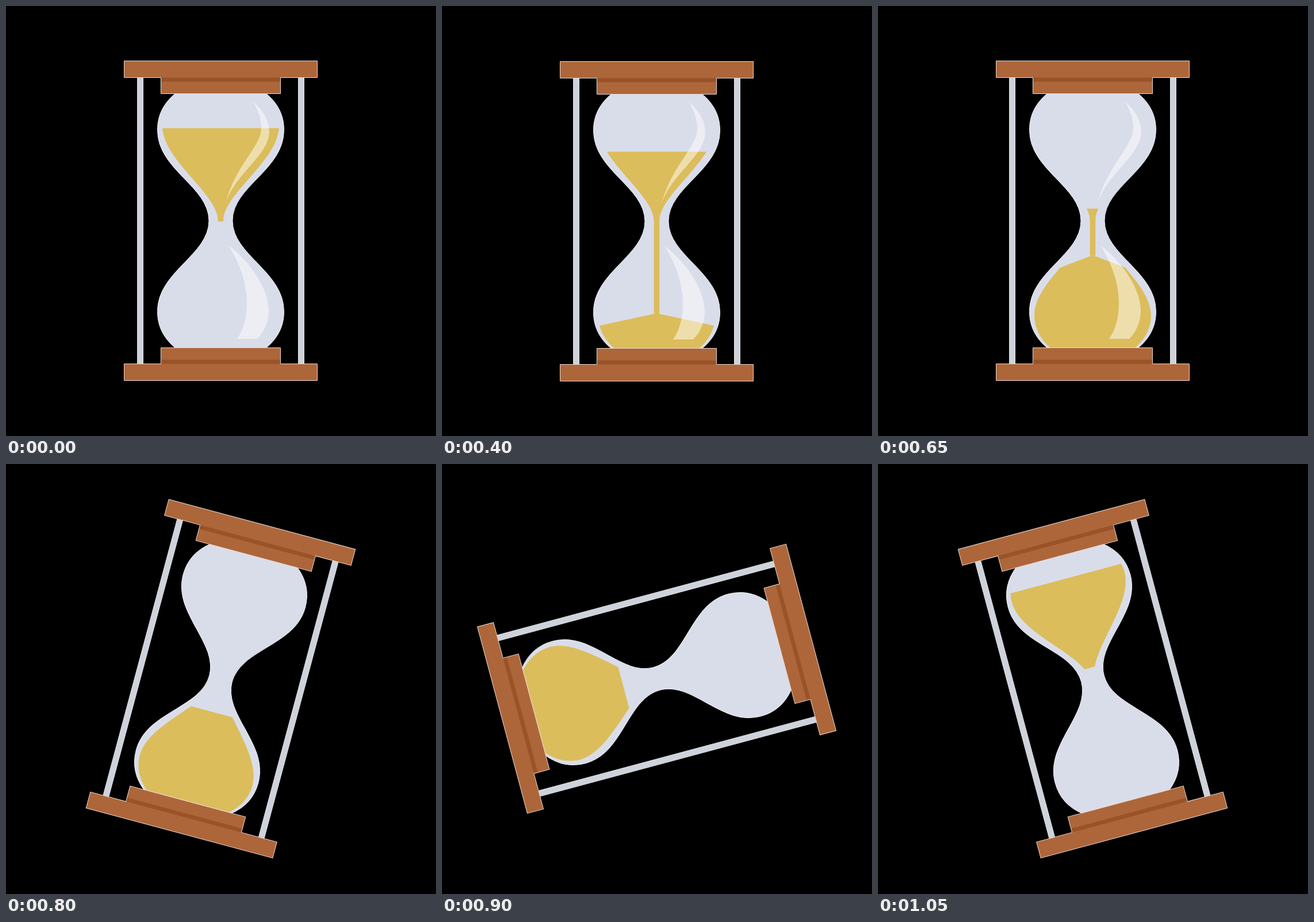
Animation, 748 px wide and 748 px high, one loop 1100 ms. Source, as an HTML page with a canvas:

```html
<!DOCTYPE html>
<html lang="en">
<head>
<meta charset="utf-8">
<title>Hourglass</title>
<style>
  html, body { margin: 0; width: 100%; height: 100%; overflow: hidden; background: #000; }
  canvas { display: block; width: 100vw; height: 100vh; }
</style>
</head>
<body>
<canvas id="stage" width="748" height="748"></canvas>
<script>
const ctx = document.getElementById('stage').getContext('2d');
const LOOP = 1100, STEP = 50, SPEED = 0.4;
const SAND = '#dcbd5c', GLASS = '#d9dde9', WOOD = '#ad663a', SHADE = '#9a5329', ROD = '#ced2da';
const WOOD_RIM = '#ecd9cf', GLASS_RIM = '#f0f2f7', ROD_RIM = '#dfe2e7';
const STREAM = 4.75, PLATEAU = 59.5, BASE = 220.4;

// Profiles of half a bulb as [half width, distance from the neck], two cubic pieces each.
const OUTER = [[20.5, 0], [20.5, 60], [110, 88], [110, 158], [110, 185], [98, 206], [78, 222]];
const INNER = [[4.75, 0], [4.25, 47], [101.5, 105], [101.5, 165], [101.5, 184], [93.5, 204], [73, 222]];

const clamp = (v, a, b) => Math.min(b, Math.max(a, v));

function tracePieces(path, p, sx, sy) {
  for (let i = 1; i < 7; i += 3) {
    path.bezierCurveTo(p[i][0] * sx, p[i][1] * sy, p[i + 1][0] * sx, p[i + 1][1] * sy,
      p[i + 2][0] * sx, p[i + 2][1] * sy);
  }
}

function bulbs(p) {
  const path = new Path2D(), back = p.slice().reverse();
  path.moveTo(p[6][0], -p[6][1]);
  tracePieces(path, back, 1, -1);
  tracePieces(path, p, 1, 1);
  path.lineTo(-p[6][0], p[6][1]);
  tracePieces(path, back, -1, 1);
  tracePieces(path, p, -1, -1);
  path.closePath();
  return path;
}

const glass = bulbs(OUTER), cavity = bulbs(INNER);

function cubic(p, i, axis, u) {
  const v = 1 - u;
  return v * v * v * p[i][axis] + 3 * v * v * u * p[i + 1][axis] +
    3 * v * u * u * p[i + 2][axis] + u * u * u * p[i + 3][axis];
}

function cavityWidth(y) {
  const i = y < INNER[3][1] ? 0 : 3;
  let lo = 0, hi = 1;
  for (let k = 0; k < 20; k++) {
    const mid = (lo + hi) / 2;
    if (cubic(INNER, i, 1, mid) < y) lo = mid; else hi = mid;
  }
  return cubic(INNER, i, 0, lo);
}

function band(top, bottom) {
  ctx.fillRect(-120, top, 240, bottom - top);
}

function polygon(points) {
  ctx.beginPath();
  points.forEach(([x, y]) => ctx.lineTo(x, y));
  ctx.closePath();
}

function drawRods() {
  ctx.fillStyle = ROD;
  ctx.strokeStyle = ROD_RIM;
  for (const x of [-145, 135]) {
    ctx.fillRect(x, -250, 10, 500);
    ctx.strokeRect(x, -250, 10, 500);
  }
}

function drawGlass() {
  ctx.fillStyle = GLASS;
  ctx.strokeStyle = GLASS_RIM;
  ctx.fill(glass);
  ctx.stroke(glass);
}

function drawWood(side) {
  ctx.save();
  ctx.scale(1, side);
  polygon([[-168, -278], [168, -278], [168, -249], [104, -249],
    [104, -221], [-104, -221], [-104, -249], [-168, -249]]);
  ctx.fillStyle = WOOD;
  ctx.fill();
  ctx.fillStyle = SHADE;
  ctx.fillRect(-104, -249, 208, 7);
  ctx.strokeStyle = WOOD_RIM;
  ctx.stroke();
  ctx.restore();
}

function drawStream(top, front, bottom) {
  const r = STREAM;
  ctx.beginPath();
  if (front < bottom) {
    // Falling front with a split, pointed end.
    ctx.moveTo(-r, top);
    ctx.lineTo(r, top);
    ctx.lineTo(r, Math.max(top, front - 26));
    ctx.quadraticCurveTo(3, front - 42, 0.5, front - 42);
    ctx.quadraticCurveTo(-2.5, front - 40, -r, front);
  } else if (top < bottom) {
    ctx.rect(-r, top, 2 * r, bottom - top);
  }
  ctx.fill();
}

function drawFlow(t) {
  const level = -161 + SPEED * Math.max(0, t - 300);
  const apex = Math.max(PLATEAU, 160 - SPEED * (t - 400));
  const edge = Math.max(PLATEAU, 181.5 - SPEED * (t - 400));

  ctx.save();
  ctx.clip(cavity);
  if (level < 0) band(level, 0.5);
  if (t >= 250) {
    const w = cavityWidth(Math.min(edge, BASE));
    polygon([[0, apex], [w, edge], [120, edge], [120, 230], [-120, 230], [-120, edge], [-w, edge]]);
    ctx.fill();
  }
  ctx.restore();

  if (t < 100) {
    ctx.beginPath();
    ctx.ellipse(0, -0.5, STREAM, 2, 0, 0, Math.PI);
    ctx.fill();
  } else {
    const top = t <= 650 ? Math.max(level, -1) : -21 + 0.92 * (t - 650);
    drawStream(top, 0.92 * (t - 50), t < 250 ? BASE : apex + 1);
  }
}

function drawSlidingSand(t) {
  const shift = SPEED * Math.max(0, t - 950);
  ctx.save();
  ctx.clip(cavity);
  band(PLATEAU - shift, BASE - shift);
  ctx.restore();
}

function drawGleams() {
  ctx.save();
  ctx.translate(-373.5, -373.5);
  ctx.fillStyle = 'rgba(255,255,255,.49)';
  ctx.fill(new Path2D('M429 165C448 182 458 200 458 220C455 262 400 290 382 343' +
    'C400 275 444 245 444 212C444 195 438 180 429 165Z'));
  ctx.fill(new Path2D('M387 416C430 450 457 495 457 530C457 550 449 567 437 579' +
    'L402 579C414 562 419 540 419 517C419 480 405 445 387 416Z'));
  ctx.restore();
}

function draw(t) {
  const turning = t >= 775;
  const angle = clamp(0.6 * (t - 775), 0, 180);
  const sag = t >= 100 && t < 650 ? 1 : 0;

  ctx.setTransform(1, 0, 0, 1, 0, 0);
  ctx.fillStyle = '#000';
  ctx.fillRect(0, 0, 748, 748);
  ctx.translate(373.5, 373.5 + sag);
  ctx.rotate(angle * Math.PI / 180);
  ctx.lineWidth = 1;

  drawRods();
  drawGlass();
  ctx.fillStyle = SAND;
  if (turning) {
    drawSlidingSand(t);
  } else {
    drawFlow(t);
    drawGleams();
  }
  drawWood(1);
  drawWood(-1);
}

const start = performance.now();

function tick() {
  const t = (performance.now() - start) % LOOP;
  draw(t < 100 ? 0 : Math.floor(t / STEP) * STEP);
  requestAnimationFrame(tick);
}
tick();
</script>
</body>
</html>
```
